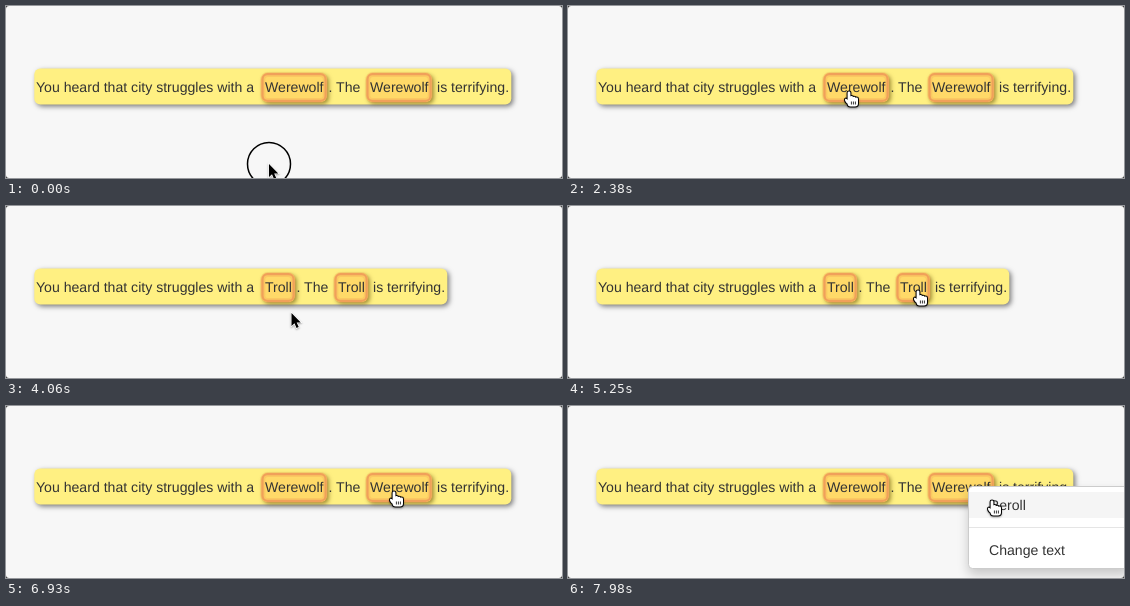
Recreate the animation shown at these times as an HTML page with a canvas. Size 556x172 px, loop 8 s.

```html
<!DOCTYPE html>
<html lang="en">
<head>
<meta charset="utf-8">
<title>Werewolf or Troll</title>
<style>
  html, body { margin: 0; width: 100%; height: 100%; overflow: hidden; background: #333; }
  canvas { display: block; }
</style>
</head>
<body>
<canvas id="stage" width="556" height="172"></canvas>
<script>
const ctx = document.getElementById('stage').getContext('2d');
const LOOP = 8000, PRESS = 120, FADE = 200;
const TROLL_AT = 2590, WEREWOLF_AT = 5460, MENU_AT = 7110;
const PRESSES = [-30, 2440, 5310, 7060];

// The pointer rests at each stop until the next move begins.
const HOME = { x: 263, y: 158 };
const MOVES = [
  { from: 700, to: 1320, x: 275, y: 90.5 },
  { from: 1400, to: 2330, x: 281, y: 85 },
  { from: 3150, to: 3780, x: 285.5, y: 107 },
  { from: 4060, to: 5040, x: 350, y: 84 },
  { from: 6020, to: 6370, x: 363, y: 112 },
  { from: 6580, to: 6900, x: 388, y: 85 },
  { from: 6930, to: 7050, x: 401, y: 81 },
  { from: 7420, to: 7840, x: 424, y: 94 }
];

const clamp = k => Math.min(1, Math.max(0, k));
const ease = k => k * k * (3 - 2 * k);

function pointerAt(t) {
  return MOVES.reduce((p, move) => {
    const k = ease(clamp((t - move.from) / (move.to - move.from)));
    return { x: p.x + (move.x - p.x) * k, y: p.y + (move.y - p.y) * k };
  }, HOME);
}

function roundBox(x, y, w, h, r) {
  ctx.beginPath();
  ctx.roundRect(x, y, w, h, r);
}

function fill(color) {
  ctx.fillStyle = color;
  ctx.fill();
}

function stroke(color, width) {
  ctx.strokeStyle = color;
  ctx.lineWidth = width;
  ctx.stroke();
}

function withShadow(color, dx, dy, blur, paint) {
  ctx.save();
  ctx.shadowColor = color;
  ctx.shadowOffsetX = dx;
  ctx.shadowOffsetY = dy;
  ctx.shadowBlur = blur;
  paint();
  ctx.restore();
}

function text(str, x, y) {
  ctx.fillStyle = '#333';
  ctx.fillText(str, x, y);
}

function layout(t) {
  const troll = t >= TROLL_AT && t < WEREWOLF_AT;
  const cut = troll ? 32 : 0;
  return {
    word: troll ? 'Troll' : 'Werewolf',
    cut,
    chips: [255.3, 360.3 - cut].map(x => ({ x, w: 65.5 - cut }))
  };
}

function drawChip({ x, w }, word) {
  roundBox(x, 67, w, 29, 6);
  withShadow('rgba(90,70,0,.6)', 2, 2, 4, () => fill('#ffd968'));
  roundBox(x + 1.5, 68.5, w - 3, 26, 5);
  stroke('rgba(240,160,80,.3)', 5);
  roundBox(x + 1.2, 68.2, w - 2.4, 26.6, 5);
  stroke('#f0a05a', 2.2);
  text(word, x + 3.7, 86);
}

function drawCard({ word, cut, chips }) {
  roundBox(28.3, 62.5, 477 - 2 * cut, 36, 6);
  withShadow('rgba(0,0,0,.5)', 2, 2, 5, () => fill('#fff082'));
  text('You heard that city struggles with a', 30, 86);
  chips.forEach(chip => drawChip(chip, word));
  text('. The', 322.5 - cut, 86);
  text('is terrifying.', 431 - 2 * cut, 86);
}

function drawMenu(hover) {
  roundBox(400.5, 80.5, 161, 82, 4);
  withShadow('rgba(0,0,0,.2)', 0, 6, 12, () => fill('#fff'));
  stroke('#ccc', 1);
  if (hover) {
    ctx.fillStyle = '#f5f5f5';
    ctx.fillRect(401, 86, 160, 26);
  }
  ctx.fillStyle = '#e5e5e5';
  ctx.fillRect(401, 121, 160, 1);
  text('Reroll', 421, 104);
  text('Change text', 421, 149);
}

function drawRing(t, p) {
  const press = PRESSES.find(down => t >= down && t < down + PRESS + FADE);
  if (press === undefined) return;
  const k = clamp((t - press - PRESS) / FADE);
  ctx.beginPath();
  ctx.arc(p.x, p.y, 21.5 + 9 * k, 0, 2 * Math.PI);
  stroke(`rgba(0,0,0,${1 - k})`, 1.5);
}

function pointerKind(p, chips, menu) {
  if (menu && p.x >= 401 && p.y >= 81) return p.y >= 86 ? drawHand : drawArrow;
  const onChip = chips.some(c => p.x >= c.x && p.x <= c.x + c.w && p.y >= 67 && p.y <= 96);
  if (onChip) return drawHand;
  return p.y > 73 && p.y < 90 ? drawBeam : drawArrow;
}

function drawArrow() {
  const arrow = new Path2D('M0 0V13L3 10.2L5 15L7.2 14L5.2 9.4H9.3Z');
  ctx.strokeStyle = '#fff';
  ctx.lineWidth = 1.4;
  withShadow('rgba(0,0,0,.35)', 0, 1, 2, () => ctx.stroke(arrow));
  ctx.fillStyle = '#000';
  ctx.fill(arrow);
}

function drawBeam() {
  ctx.beginPath();
  for (const side of [-1, 1]) {
    ctx.moveTo(2.5 * side, -7);
    ctx.quadraticCurveTo(0, -7, 0, -5);
    ctx.lineTo(0, 5);
    ctx.quadraticCurveTo(0, 7, 2.5 * side, 7);
  }
  stroke('#222', 1);
}

function drawHand() {
  const hand = new Path2D(), folds = new Path2D();
  hand.roundRect(-1.4, 0.4, 2.8, 10, 1.4);
  hand.roundRect(-1.4, 8, 10.4, 7.6, 3);
  hand.ellipse(-2, 10.3, 1.4, 3, -0.6, 0, 2 * Math.PI);
  for (let i = 0; i < 3; i++) {
    hand.roundRect(1.2 + 2.5 * i, 5 + 0.8 * i, 2.8, 6, 1.4);
    folds.moveTo(2.4 + 2 * i, 10.5);
    folds.lineTo(2.4 + 2 * i, 13.5);
  }
  ctx.strokeStyle = '#000';
  ctx.lineWidth = 2;
  withShadow('rgba(0,0,0,.35)', 0, 1, 2, () => ctx.stroke(hand));
  ctx.fillStyle = '#fff';
  ctx.fill(hand);
  ctx.lineWidth = 0.8;
  ctx.stroke(folds);
}

function draw(t) {
  const p = pointerAt(t), view = layout(t), menu = t >= MENU_AT;
  const { width, height } = ctx.canvas;
  ctx.clearRect(0, 0, width, height);
  roundBox(0, 0, width, height, 3);
  fill('#f7f7f7');
  ctx.font = '14.1px "Liberation Sans", Arial, sans-serif';
  ctx.textRendering = 'geometricPrecision';
  drawCard(view);
  if (menu) drawMenu(p.y >= 86);
  drawRing(t, p);
  ctx.save();
  ctx.translate(p.x, p.y);
  pointerKind(p, view.chips, menu)();
  ctx.restore();
}

function tick() {
  draw(performance.now() % LOOP);
  requestAnimationFrame(tick);
}
tick();
</script>
</body>
</html>
```
